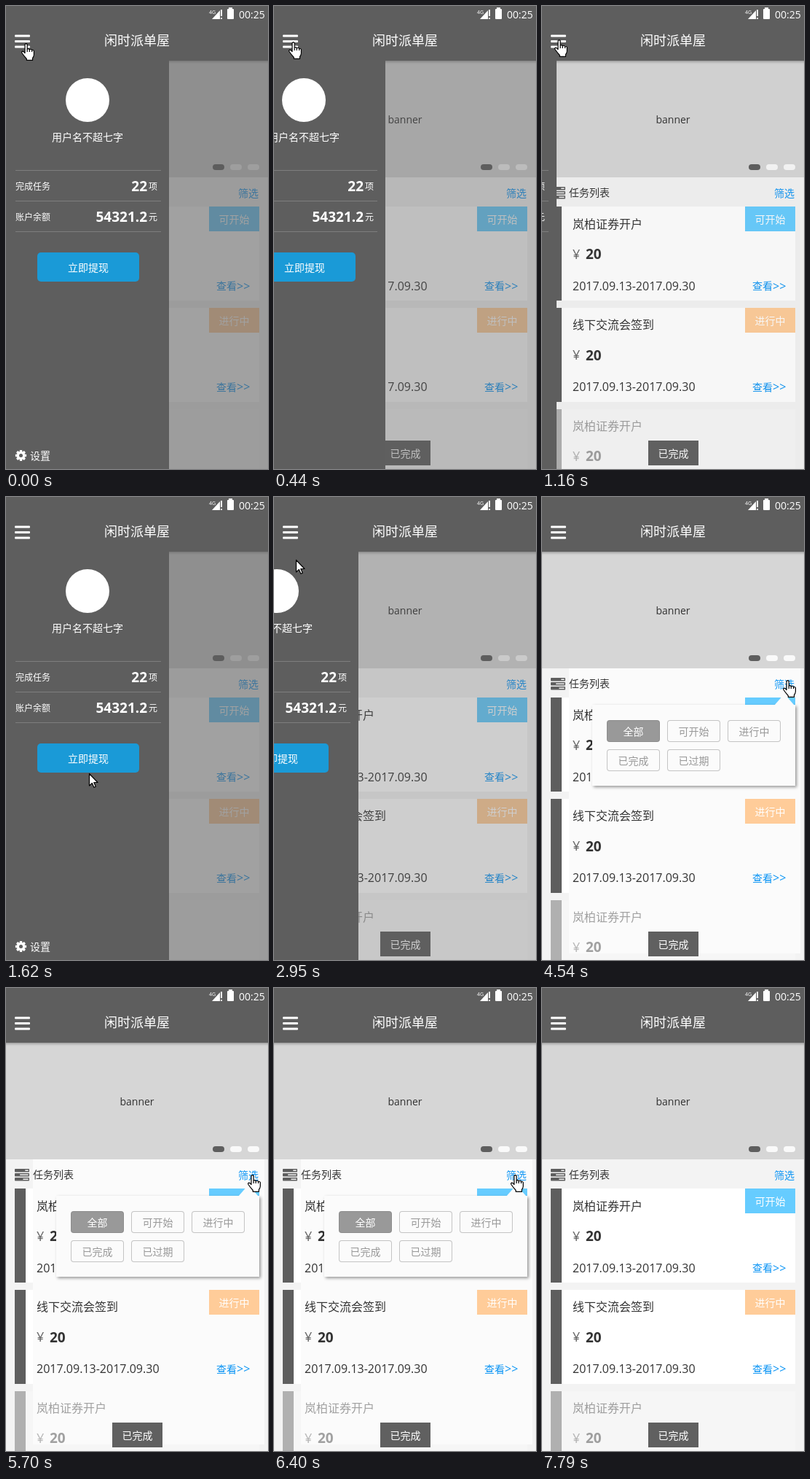
Recreate the animation shown at these times as an HTML page with a canvas. Size 360x635 px, loop 8.16 s.

```html
<!DOCTYPE html>
<html lang="zh-CN">
<head>
<meta charset="utf-8">
<title>闲时派单屋</title>
<style>
html, body { margin: 0; width: 100%; height: 100%; overflow: hidden; background: #f3f3f3; }
canvas { display: block; width: 360px; height: 635px; }
</style>
</head>
<body>
<canvas id="stage"></canvas>
<script>
const W = 360, H = 635, LOOP = 8160, DRAWER = 224;
const GREY = '#5e5e5e', LINK = '#0a94f5';
const FONT = '"Open Sans", "Noto Sans CJK SC", "Noto Sans CJK", "Noto Sans CJK JP", sans-serif';

const canvas = document.getElementById('stage');
const dpr = window.devicePixelRatio || 1;
canvas.width = W * dpr;
canvas.height = H * dpr;
const c = canvas.getContext('2d');

// Spans in which the picture moves: start, end, number of steps
const spans = [
  [380, 610, 5], [1160, 1960, 15], [2080, 2650, 11], [2890, 3650, 13], [3890, 4540, 12],
  [4840, 4900, 2], [5140, 5140, 1], [5700, 6400, 11], [7020, 7790, 14]
];
// Drawer slides: start, from, to
const slides = [[345, 1, 0], [1112, 0, 1], [2828, 1, 0]];
const SLIDE_MS = 250;
const popupTimes = [[4540, 4840], [5140, 5980], [6400, 7300]];
// Pointer: time, x, y
const pointer = [
  [330, 27, 51], [600, 23, 46], [1160, 23, 46], [1620, 114, 379], [1940, 115, 357],
  [2030, 115, 357], [2640, 20, 54], [2830, 20, 54], [2950, 30, 86], [3640, 210, 200],
  [3840, 210, 200], [4260, 350, 238], [4490, 337, 251], [5650, 337, 251], [5960, 351, 330],
  [6350, 331, 256], [6970, 331, 256], [7300, 350, 410], [7780, 300, 642]
];

const ease = u => (1 - Math.cos(Math.PI * Math.min(1, Math.max(0, u)))) / 2;
const mix = (a, b, u) => a + (b - a) * u;

function snap(t) {
  let last = 0;
  for (const [a, b, n] of spans) {
    if (t < a) break;
    if (t >= b) { last = b; continue; }
    const step = (b - a) / (n - 1);
    const k = Math.min(n - 1, Math.floor((t + 5 - a) / step));
    return Math.round((a + k * step) / 10) * 10;
  }
  return last;
}

function drawerAt(t) {
  let v = 1;
  for (const [start, from, to] of slides) {
    if (t >= start) v = mix(from, to, ease((t - start) / SLIDE_MS));
  }
  return v;
}

function pointerAt(t) {
  if (t <= pointer[0][0]) return pointer[0].slice(1);
  for (let i = 1; i < pointer.length; i++) {
    const [t0, x0, y0] = pointer[i - 1], [t1, x1, y1] = pointer[i];
    if (t < t1) {
      const u = ease((t - t0) / (t1 - t0));
      return [Math.round(mix(x0, x1, u)), Math.round(mix(y0, y1, u))];
    }
  }
  return pointer[pointer.length - 1].slice(1);
}

function rect(x, y, w, h, color, r = 0) {
  c.fillStyle = color;
  c.beginPath();
  if (r) c.roundRect(x, y, w, h, r); else c.rect(x, y, w, h);
  c.fill();
}

function disc(x, y, r, color) {
  c.fillStyle = color;
  c.beginPath();
  c.arc(x, y, r, 0, 7);
  c.fill();
}

function poly(points, color) {
  c.fillStyle = color;
  c.beginPath();
  points.forEach(([x, y]) => c.lineTo(x, y));
  c.fill();
}

// y is the middle of the capitals
function text(s, x, y, size, color, align = 'left', weight = 400) {
  c.font = `${weight} ${size}px ${FONT}`;
  c.textAlign = align;
  c.fillStyle = color;
  c.fillText(s, x, Math.round(y + size * 0.36));
}

function withShadow(color, blur, dx, dy, draw) {
  c.save();
  c.shadowColor = color;
  c.shadowBlur = blur * dpr;
  c.shadowOffsetX = dx * dpr;
  c.shadowOffsetY = dy * dpr;
  draw();
  c.restore();
}

function listIcon() {
  [0.714, 0.357, 0.57].forEach((f, i) => {
    const y = 248 + i * 6;
    rect(12, y, 20, 4.5, GREY, 0.8);
    rect(12 + 20 * f, y + 1.5, 20 * (0.93 - f), 1.5, '#f3f3f3');
  });
}

const tasks = [
  { title: '岚柏证券开户', tag: '可开始', color: '#66ccff' },
  { title: '线下交流会签到', tag: '进行中', color: '#ffcc99' },
  { title: '岚柏证券开户', faded: true }
];

function page(popup) {
  rect(0, 0, W, H, '#f3f3f3');
  rect(0, 75, W, 160, '#d6d6d6');
  text('banner', 180, 156, 14, '#333', 'center');
  [GREY, '#f9f9f9', '#f9f9f9'].forEach((color, i) => rect(284 + 24 * i, 217, 16, 8, color, 4));

  tasks.forEach((task, i) => {
    const y = 275 + 139 * i;
    rect(27, y, 321, 129, task.faded ? '#f6f6f6' : '#fff');
    c.globalAlpha = task.faded ? 0.45 : 1;
    rect(12, y, 15, 129, GREY);
    c.globalAlpha = 1;
  });
  if (popup) rect(37, 235, 318, 391, '#fbfbfb');

  listIcon();
  text('任务列表', 37, 256, 14, '#333');
  text('筛选', 319, 257, 14, LINK);

  tasks.forEach((task, i) => {
    const dy = 138.5 * i;
    c.globalAlpha = task.faded ? 0.45 : 1;
    text(task.title, 42, 299 + dy, 16, '#333');
    text('¥', 42, 340.5 + dy, 18, '#666');
    text('20', 60, 340.5 + dy, 19, '#333', 'left', 700);
    text('2017.09.13-2017.09.30', 42, 384 + dy, 16, '#333');
    if (task.tag) {
      rect(279, 275 + 139 * i, 69, 34, task.color);
      text(task.tag, 313.5, 293 + dy, 14, '#fff', 'center');
      text('查看', 289, 384 + dy, 14, LINK);
      text('>>', 317, 384 + dy, 16, LINK);
    }
  });
  c.globalAlpha = 1;

  rect(146, 596, 69, 34, '#606060');
  text('已完成', 180.5, 614, 14, '#fff', 'center');
}

function filterPopup() {
  withShadow('rgba(0,0,0,.4)', 4, 2, 2, () => rect(69, 285, 279, 111, '#fbfbfb'));
  poly([[319, 286], [333, 270], [347, 286]], '#fbfbfb');
  ['全部', '可开始', '进行中', '已完成', '已过期'].forEach((label, i) => {
    const x = 89 + 83 * (i % 3), y = 306 + 40 * Math.floor(i / 3);
    rect(x, y, 73, 30, i ? '#c4c4c4' : '#8c8c8c', 4);
    rect(x + 1, y + 1, 71, 28, i ? '#fbfbfb' : '#999', 3);
    text(label, x + 36.5, y + 16, 14, i ? '#999' : '#fff', 'center');
  });
}

function header() {
  withShadow('rgba(0,0,0,.4)', 4, 0, 1, () => rect(-10, -10, W + 20, 85, GREY));
}

function headerContent() {
  for (let i = 0; i < 3; i++) rect(12, 39.5 + 7.5 * i, 21, 3, '#fff', 1);
  text('闲时派单屋', 180, 48, 18, '#fff', 'center');
  text('4G', 279, 8, 7, '#fff');
  poly([[283, 18], [294, 6], [294, 18]], '#fff');
  rect(295, 5, 2, 9, '#fff');
  rect(295, 16, 2, 2, '#fff');
  rect(306, 2, 5, 3, '#fff');
  rect(304, 4, 9, 14, '#fff', 1);
  text('00:25', 320, 12, 14, '#fff', 'left', 500);
}

function gear(x, y) {
  c.save();
  c.translate(x, y);
  for (let i = 0; i < 8; i++) {
    rect(-1.7, -7.6, 3.4, 4, '#fff', 0.6);
    c.rotate(Math.PI / 4);
  }
  c.restore();
  disc(x, y, 5.7, '#fff');
  disc(x, y, 2.5, GREY);
}

function drawer(v) {
  if (v <= 0) return;
  c.save();
  c.translate(Math.round((v - 1) * DRAWER), 0);
  rect(0, 74, DRAWER, H - 74, GREY);
  disc(112, 129, 30, '#fff');
  text('用户名不超七字', 112, 180, 14, '#fff', 'center', 500);
  [225, 267, 309].forEach(y => rect(13, y, 200, 1, '#7e7e7e'));
  [['完成任务', '22', '项'], ['账户余额', '54321.2', '元']].forEach(([label, value, unit], i) => {
    const y = 248 + 42 * i;
    text(label, 13, y, 12, '#fff', 'left', 500);
    text(value, 194, y - 1, 19, '#fff', 'right', 700);
    text(unit, 196, y, 12, '#fff', 'left', 500);
  });
  rect(43, 338, 140, 40, '#1a9ad7', 5);
  text('立即提现', 113, 359, 14, '#fff', 'center', 500);
  gear(20.5, 616.5);
  text('设置', 33, 617, 14, '#fff', 'left', 500);
  c.restore();
}

const arrow = new Path2D('M.5 .5V17L4.3 13.5L6.9 19.3L9.3 18.2L6.8 12.5H12Z');
const hand = new Path2D('M5 1.8Q6.6-.6 8.2 1.8V8Q10 6.8 11.3 8.6Q13.3 7.6 14.6 9.4Q16.6 8.8 17.4 10.8' +
  'V16Q17 19 15.5 20.5V23.3H7.3V21.5Q4 18 1 13.5Q0 11.5 1.8 11.2Q3.5 11.3 5 13.6Z');
const knuckles = new Path2D('M8.2 8V12M11.3 8.6V12M14.6 9.4V12');

function cursor(x, y, open) {
  const inside = (l, t, r, b) => x >= l && x <= r && y >= t && y <= b;
  const pointing = inside(0, 30, 45, 75) || inside(319, 246, 348, 266) ||
    (open && inside(43, 338, 183, 378));
  c.save();
  c.translate(pointing ? x - 6 : x, y);
  c.lineWidth = 1.2;
  c.lineJoin = 'round';
  c.strokeStyle = '#000';
  c.fillStyle = '#fff';
  const shape = pointing ? hand : arrow;
  c.fill(shape);
  c.stroke(shape);
  if (pointing) c.stroke(knuckles);
  c.restore();
}

function render(time) {
  const t = snap(time);
  const v = drawerAt(t);
  const popup = popupTimes.some(([a, b]) => t >= a && t < b);
  c.setTransform(dpr, 0, 0, dpr, 0, 0);
  page(popup);
  if (popup) filterPopup();
  header();
  c.globalAlpha = 0.58 * v;
  rect(0, 75, W, H - 75, GREY);
  c.globalAlpha = 1;
  drawer(v);
  headerContent();
  const [x, y] = pointerAt(t);
  cursor(x, y, v > 0.9);
}

const start = performance.now();
function frame() {
  render((performance.now() - start) % LOOP);
  requestAnimationFrame(frame);
}
frame();
</script>
</body>
</html>
```
